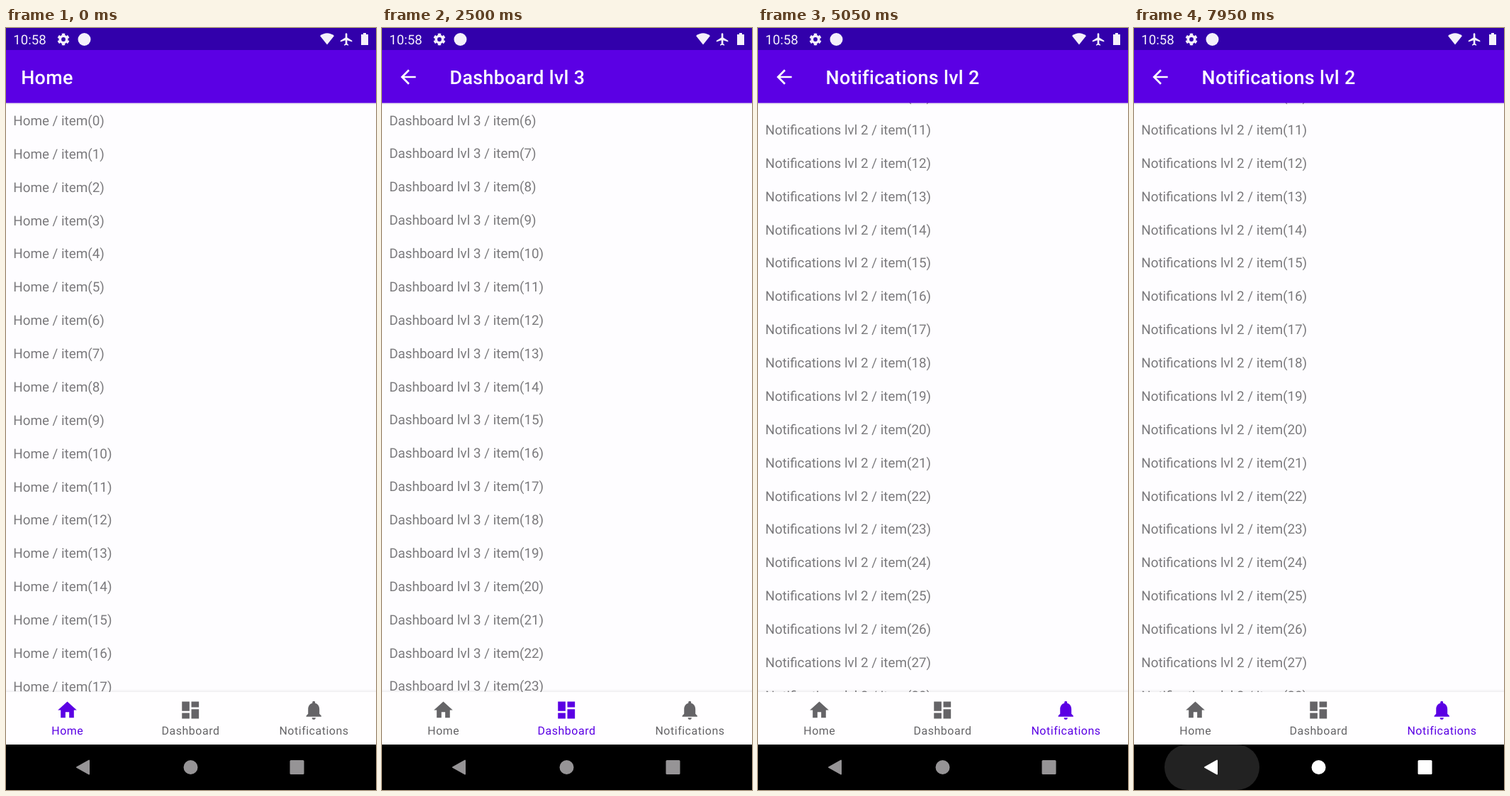
These frames come from a looping animation (522 by 1073 pixels, 8000 ms). An HTML page with a canvas:

```html
<!DOCTYPE html>
<html lang="en">
<head>
<meta charset="utf-8">
<title>Tabs with nested screens</title>
<style>
html, body { margin: 0; width: 522px; height: 1073px; overflow: hidden; background: #000; }
canvas { display: block; }
</style>
</head>
<body>
<canvas id="stage" width="522" height="1073"></canvas>
<script>
const ctx = document.getElementById('stage').getContext('2d');
const LOOP = 8000, DP = 1.329, ROW = 46.875;
const BAR_END = 105.6, HEADER_END = 265.3;
const PURPLE = '#5b00e4', STATUS = '#3200ab', PAPER = '#fefdff', GREEN = '#4bf285';
const TEXT = '#7b7a7d', IDLE = '#656467';

const icons = {
  home: 'M10 20v-6h4v6h5v-8h3L12 3 2 12h3v8z',
  dashboard: 'M3 13h8V3H3zm0 8h8v-6H3zm10 0h8V11h-8zm0-18v6h8V3z',
  bell: 'M12 22c1.1 0 2-.9 2-2h-4c0 1.1.9 2 2 2zm6-6v-5c0-3.07-1.64-5.64-4.5-6.32V4c0-.83-.67-1.5-1.5-1.5s-1.5.67-1.5 1.5v.68C7.63 5.36 6 7.92 6 11v5l-2 2v1h16v-1z',
  arrow: 'M20 11H7.83l5.59-5.59L12 4l-8 8 8 8 1.41-1.41L7.83 13H20z',
  plane: 'M21 16v-2l-8-5V3.5c0-.83-.67-1.5-1.5-1.5S10 2.67 10 3.5V9l-8 5v2l8-2.5V19l-2 1.5V22l3.5-1 3.5 1v-1.5L13 19v-5.5z'
};
for (const name in icons) icons[name] = new Path2D(icons[name]);

const tabs = [['Home', 'home', 86.8], ['Dashboard', 'dashboard', 260.5], ['Notifications', 'bell', 434.5]];

// [start time, tab, level]
const screens = [
  [0, 0, 1], [50, 0, 2], [1000, 1, 1], [1550, 1, 2], [2000, 1, 3],
  [3750, 2, 1], [4350, 2, 2], [5450, 2, 3], [7850, 2, 2]
];

const clamp = v => Math.max(0, Math.min(1, v));
const ramp = (t, a, b) => clamp((t - a) / (b - a));
const easeOut = p => 1 - (1 - p) ** 3;

function rect(x, y, w, h, color) {
  ctx.fillStyle = color;
  ctx.fillRect(x, y, w, h);
}

function disc(x, y, r, color) {
  ctx.fillStyle = color;
  ctx.beginPath();
  ctx.arc(x, y, r, 0, 7);
  ctx.fill();
}

function text(str, x, y, size, color, { weight = 400, spacing = 0, align = 'left' } = {}) {
  ctx.font = `${weight} ${size}px Roboto, sans-serif`;
  ctx.textRendering = 'geometricPrecision';
  ctx.letterSpacing = spacing * size + 'px';
  ctx.textAlign = align;
  ctx.fillStyle = color;
  ctx.fillText(str, x, y);
}

function icon(name, cx, cy, color, scale = DP) {
  ctx.save();
  ctx.translate(cx - 12 * scale, cy - 12 * scale);
  ctx.scale(scale, scale);
  ctx.fillStyle = color;
  ctx.fill(icons[name]);
  ctx.restore();
}

function clipped(x, y, w, h, draw) {
  ctx.save();
  ctx.beginPath();
  ctx.rect(x, y, w, h);
  ctx.clip();
  draw();
  ctx.restore();
}

function list(top, bottom, offset, label) {
  rect(0, 0, 522, bottom, PAPER);
  clipped(0, 0, 522, bottom, () => {
    const first = Math.max(0, Math.floor(offset / ROW) - 1);
    for (let i = first; top + i * ROW - offset < bottom; i++)
      text(label(i), 10.2, top + 31.3 + i * ROW - offset, 18.85, TEXT);
  });
}

function shadow(y, h, from, to) {
  const g = ctx.createLinearGradient(0, y, 0, y + h);
  g.addColorStop(0, from);
  g.addColorStop(1, to);
  rect(0, y, 522, h, g);
}

function statusBar() {
  const white = '#f4f0fb';
  text('10:58', 10.3, 22.5, 18.6, white);
  ctx.strokeStyle = white;
  ctx.lineWidth = 3.6;
  ctx.beginPath();
  ctx.arc(81, 16, 4.7, 0, 7);
  ctx.stroke();
  ctx.lineWidth = 2.6;
  for (let i = 0; i < 6; i++) {
    const a = i * Math.PI / 3 + Math.PI / 6;
    ctx.beginPath();
    ctx.arc(81, 16, 7.2, a - .3, a + .3);
    ctx.stroke();
  }
  disc(110.5, 16, 9, white);
  ctx.beginPath();
  ctx.moveTo(453, 23.5);
  ctx.lineTo(443, 11);
  ctx.quadraticCurveTo(453, 3.5, 463, 11);
  ctx.fill();
  icon('plane', 480.5, 16, white, .87);
  rect(501, 9, 10, 15, white);
  rect(504, 7, 4, 2, white);
}

function scrollOffset(t, tab, level) {
  if (tab === 1 && level === 3) return 490 * easeOut(ramp(t, 2320, 3050));
  if (tab === 2 && level === 2) return 502.6 * easeOut(ramp(t, 4660, 5050));
  return 0;
}

function tabRipple(t, start, cx) {
  const age = t - start;
  if (age < 0 || age > 430) return;
  ctx.globalAlpha = .12 * (1 - ramp(age, 180, 430));
  disc(cx, 971, 30 + 65 * easeOut(ramp(age, -40, 200)), PURPLE);
  ctx.globalAlpha = 1;
}

function tabScreen(t) {
  const [, tab, level] = screens.filter(s => s[0] <= t).pop();
  const title = tabs[tab][0] + (level > 1 ? ' lvl ' + level : '');
  list(BAR_END, 935, scrollOffset(t, tab, level), i => `${title} / item(${i})`);

  shadow(BAR_END, 3, 'rgba(60,40,90,.14)', 'rgba(60,40,90,0)');
  rect(0, 31, 522, BAR_END - 31, PURPLE);
  rect(0, 0, 522, 31, STATUS);
  if (level > 1) icon('arrow', 37, 69, '#fff');
  text(title, level > 1 ? 95.6 : 21.2, 79, 26.85, '#fff', { weight: 500, spacing: .0125 });
  statusBar();

  shadow(931, 4, 'rgba(0,0,0,0)', 'rgba(0,0,0,.06)');
  rect(0, 935, 522, 74, '#fffeff');
  clipped(0, 935, 522, 74, () => {
    tabRipple(t, 900, tabs[1][2]);
    tabRipple(t, 3650, tabs[2][2]);
  });
  tabs.forEach(([label, shape, cx], i) => {
    const color = i === tab ? PURPLE : IDLE;
    icon(shape, cx - .3, 960.5, color);
    text(label, cx, 995.3, 15.95, color, { spacing: .0333, align: 'center' });
  });
}

function detailsScreen() {
  list(HEADER_END, 1009, 0, i => 'DetailsFragment ' + i);
  rect(0, 0, 522, HEADER_END, GREEN);
  clipped(0, 0, 522, HEADER_END, () => {
    const unit = 522 / 108, faint = 'rgba(255,255,255,.22)', w = .8 * unit;
    for (let n = 9; n < 108; n += 10) {
      const x = n * unit - w / 2 - .6, y = x - 128;
      const inner = n > 19 && n < 89;
      rect(x, 0, w, HEADER_END, faint);
      rect(0, y, 522, w, faint);
      if (inner) {
        rect(x, 0, w, HEADER_END, faint);
        rect(19 * unit, y, 70 * unit, w, faint);
      }
    }
  });
  icon('arrow', 37, 69, '#fff');
  text('Details', 42.5, 223, 45.2, '#fff');
  statusBar();
}

function backRipple(t, start) {
  const age = t - start;
  if (age < 0 || age > 450) return;
  const w = 64 + 70 * easeOut(ramp(age, -40, 190));
  ctx.globalAlpha = .135 * (1 - ramp(age, 230, 450));
  ctx.fillStyle = '#fff';
  ctx.beginPath();
  ctx.roundRect(110 - w / 2, 1009, w, 64, 32);
  ctx.fill();
  ctx.globalAlpha = 1;
}

function systemBar(t) {
  rect(0, 1009, 522, 64, '#000');
  backRipple(t, 7000);
  backRipple(t, 7750);
  const color = t < 7000 ? '#969496' : '#fff';
  disc(260.5, 1041, 10, color);
  ctx.beginPath();
  ctx.roundRect(400.5, 1031, 20, 20, 1.5);
  ctx.fill();
  ctx.beginPath();
  ctx.moveTo(100, 1041);
  ctx.lineTo(117, 1031.5);
  ctx.lineTo(117, 1050.5);
  ctx.closePath();
  ctx.fill();
  ctx.strokeStyle = color;
  ctx.lineWidth = 2;
  ctx.lineJoin = 'round';
  ctx.stroke();
}

// The details screen is copied to a layer so that it fades as a whole.
const layer = document.createElement('canvas');
layer.width = 522;
layer.height = 1073;
const layerCtx = layer.getContext('2d');

function draw(t) {
  const details = ramp(t, 5930, 6230) * (1 - ramp(t, 7120, 7350));
  if (details > 0) {
    detailsScreen();
    layerCtx.drawImage(ctx.canvas, 0, 0);
  }
  if (details < 1) {
    tabScreen(t);
    ctx.globalAlpha = details;
    if (details > 0) ctx.drawImage(layer, 0, 0);
    ctx.globalAlpha = 1;
  }
  systemBar(t);
}

const begin = performance.now();
function tick() {
  draw((performance.now() - begin) % LOOP);
  requestAnimationFrame(tick);
}
tick();
</script>
</body>
</html>
```
